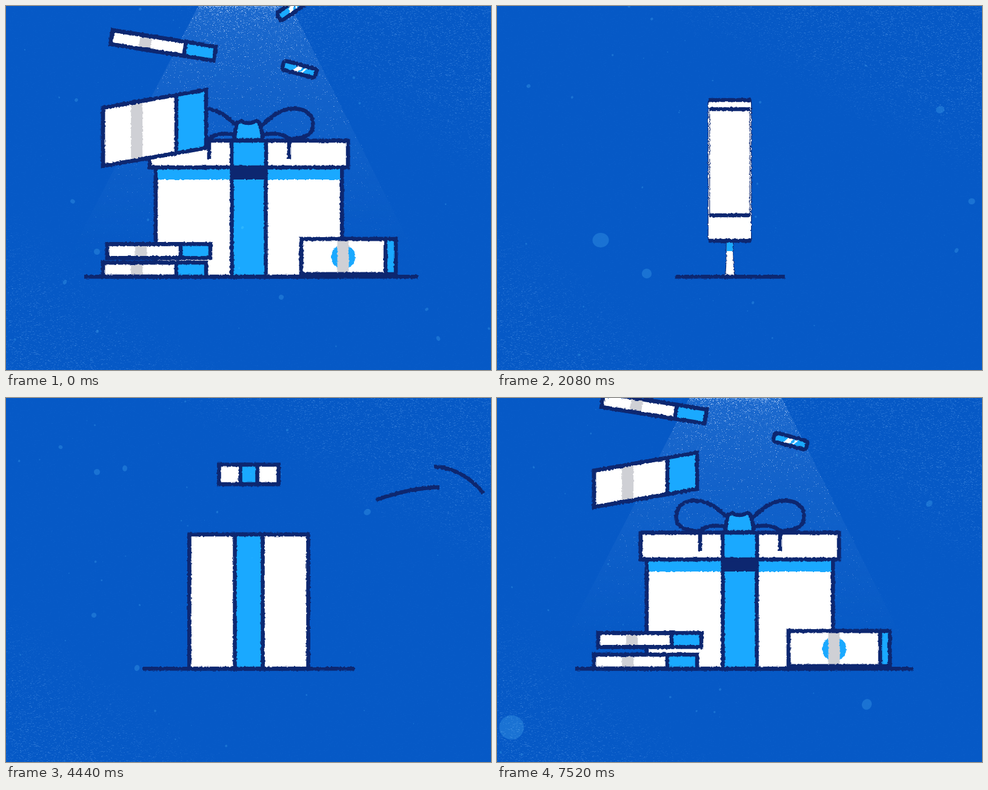
Recreate the animation shown at these times as an HTML page with a canvas. Size 800 by 600 pixels, loop 7.56 s.

```html
<!DOCTYPE html>
<html lang="en">
<head>
<meta charset="utf-8">
<title>Gift box</title>
<style>
html, body { margin: 0; width: 100%; height: 100%; overflow: hidden; background: #0659c6; }
canvas { position: absolute; left: 0; top: 0; }
#art { filter: url(#rough); }
#dust { mix-blend-mode: screen; }
svg { position: absolute; width: 0; height: 0; }
</style>
</head>
<body>
<svg><filter id="rough" x="0" y="0" width="100%" height="100%" color-interpolation-filters="sRGB">
  <feTurbulence type="fractalNoise" baseFrequency=".28" numOctaves="1" seed="4" result="n"/>
  <feDisplacementMap in="SourceGraphic" in2="n" scale="4" xChannelSelector="R" yChannelSelector="G"/>
</filter></svg>
<canvas id="paper" width="800" height="600"></canvas>
<canvas id="cone" width="800" height="600"></canvas>
<canvas id="art" width="800" height="600"></canvas>
<canvas id="dust" width="800" height="600"></canvas>
<script>
const LOOP = 7560, FRAME = 40, GROUND = 446;
const NAVY = '#0d2770', CYAN = '#1aa9ff', WHITE = '#fff', GREY = '#cfd0d5';
const el = id => document.getElementById(id);
const g = el('art').getContext('2d');

function seeded(s) {
  return () => {
    s = s + 0x6D2B79F5 | 0;
    let n = Math.imul(s ^ s >>> 15, 1 | s);
    n = n + Math.imul(n ^ n >>> 7, 61 | n) ^ n;
    return ((n ^ n >>> 14) >>> 0) / 4294967296;
  };
}

// Eased value from time/value pairs
function key(t, ...k) {
  if (t <= k[0]) return k[1];
  for (let i = 2; i < k.length; i += 2) {
    if (t > k[i]) continue;
    const f = (t - k[i - 2]) / (k[i] - k[i - 2]);
    return k[i - 1] + (k[i + 1] - k[i - 1]) * f * f * (3 - 2 * f);
  }
  return k[k.length - 1];
}

/* ---------- static textures ---------- */
function paintPaper() {
  const c = el('paper').getContext('2d'), r = seeded(3);
  c.fillStyle = '#0659c6';
  c.fillRect(0, 0, 800, 600);
  for (let i = 0; i < 50000; i++) {
    const x = r() * 800, y = r() * 600;
    const a = Math.max(x / 800 - y / 420 - .25, y / 600 - x / 800 - .5, .03);
    c.fillStyle = `rgba(95,160,235,${Math.min(.3, a * r() * 1.2)})`;
    c.fillRect(x | 0, y | 0, 1 + r() * 1.5, 1);
  }
}

function paintCone() {
  const c = el('cone').getContext('2d'), r = seeded(8);
  const glow = c.createLinearGradient(0, 0, 0, 420);
  glow.addColorStop(0, 'rgba(130,180,240,.17)');
  glow.addColorStop(.4, 'rgba(130,180,240,.09)');
  glow.addColorStop(1, 'rgba(130,180,240,0)');
  c.fillStyle = glow;
  c.beginPath();
  c.moveTo(317, 0); c.lineTo(470, 0); c.lineTo(690, 440); c.lineTo(90, 440);
  c.fill();
  for (let i = 0; i < 6500; i++) {
    const y = 430 * r() ** 1.9, left = 317 - y * .51, right = 470 + y * .51;
    c.fillStyle = `rgba(205,225,255,${(1 - y / 450) * r() ** 2.5})`;
    c.fillRect(left + (right - left) * r() | 0, y | 0, 1, 1);
  }
}

const bigSpecks = [
  [150,405,5, 97,455,4, 116,155,3, 454,480,4, 694,500,3, 713,548,4, 110,322,4],
  [171,386,12, 247,441,8, 783,322,5, 731,171,6, 758,403,4, 52,132,3],
  [150,122,5, 90,81,3, 196,116,5, 216,445,5, 355,365,5, 596,188,6, 145,358,4],
  [732,90,15, 77,471,5, 124,22,7, 794,436,7, 391,473,4, 68,424,4],
  [610,505,8, 713,174,6, 24,543,20]
];
let dustSet = -1;
function paintDust(n) {
  if (n === dustSet) return;
  dustSet = n;
  const c = el('dust').getContext('2d'), r = seeded(40 + n);
  const spot = (x, y, s) => {
    c.beginPath();
    c.ellipse(x, y, s, s * (.7 + r() * .5), r() * 3, 0, 7);
    c.fill();
  };
  c.clearRect(0, 0, 800, 600);
  c.fillStyle = 'rgba(80,155,235,.25)';
  const b = bigSpecks[n];
  for (let i = 0; i < b.length; i += 3) spot(b[i], b[i + 1], b[i + 2]);
  for (let i = 0; i < 45; i++) spot(r() * (i % 3 ? 500 : 800), r() * 600, .6 + 1.8 * r() ** 2);
}

/* ---------- drawing helpers ---------- */
function fill(x0, y0, x1, y1, color) {
  g.fillStyle = color;
  g.fillRect(x0, y0, x1 - x0, y1 - y0);
}
function outline(x0, y0, x1, y1) { g.strokeRect(x0, y0, x1 - x0, y1 - y0); }
function panel(x0, y0, x1, y1, color) {
  fill(x0, y0, x1, y1, color);
  outline(x0, y0, x1, y1);
}
function shape(d, color, line = true) {
  const p = new Path2D(d);
  if (color) { g.fillStyle = color; g.fill(p); }
  if (line) g.stroke(p);
}
function drawn(d, length, f) {
  if (f <= 0) return;
  g.setLineDash(f < 1 ? [length * f, 999] : []);
  shape(d);
  g.setLineDash([]);
}
function group(draw) { g.save(); draw(); g.restore(); }
function scaleAt(x, y, sx, sy) {
  g.translate(x, y); g.scale(sx, sy); g.translate(-x, -y);
}

/* ---------- gift ---------- */
const LOOP_D = 'M464 219C500 220 509 207 506 191C502 166 470 165 449 176C437 182 431 190 421 197';
const TAIL_D = 'M422 212C448 208 466 212 467 224L467 252';

function bow(t) {
  const grow = key(t, 4800, 0, 4920, 1.15, 5000, 1);
  const knot = t < 4000 || grow > 0;
  const size = t < 4000 ? 1 : grow;
  const side = (flip, loop, tail, stretch) => group(() => {
    if (flip) { g.translate(802, 0); g.scale(-1, 1); }
    group(() => {
      scaleAt(400, 219, 1 + (stretch - 1) * .1, stretch);
      drawn(LOOP_D, 172, loop);
    });
    drawn(TAIL_D, 82, tail);
  });
  const done = t < 4000;
  side(true, done ? 1 : key(t, 4900, 0, 5350, 1), done ? 1 : key(t, 5940, 0, 6140, 1), 1);
  side(false, done ? 1 : key(t, 5720, 0, 5920, .58, 6080, 1), done ? 1 : key(t, 5500, 0, 5700, 1),
    done ? 1 : key(t, 5920, 1.3, 6060, 1));
  if (knot && size > 0) group(() => {
    scaleAt(400, 221, 1, size);
    shape('M377 221C377 208 379 201 381 193Q386 189 391 191Q400 195 409 191Q416 188 418 193C421 201 423 208 423 221Z', CYAN);
  });
}

function gift(t) {
  const built = t < 4000;
  const turn = built ? key(t, 400, 0, 1400, 1) : 0;
  const anim = (...k) => built ? k[k.length - 1] : key(t, ...k);
  const half = anim(4040, 30, 4440, 98, 4760, 153.5);
  const top = anim(4040, 446, 4300, 212, 4440, 225, 4760, 266);
  const rib = anim(4040, 8, 4440, 23, 4760, 28);
  const C = 400.5, L = C - half, R = C + half - 2 * turn, front = C + half - 13 * turn;
  const r0 = C - rib - 6 * turn, r1 = C + rib - 9 * turn;

  panel(L, top, R, GROUND, CYAN);
  panel(L, top, front, GROUND, WHITE);
  const lidY = anim(4040, -60, 4440, 126, 4700, 250, 4780, 240, 4860, 244);
  const lidH = anim(4440, 16, 4720, 22), lidW = anim(4440, 49, 4720, 163.5);
  const landed = built || t > 4680;
  if (landed) fill(L + 3, lidY + lidH, front - 3, 286, CYAN);
  panel(r0, top, r1, GROUND, CYAN);
  if (landed) fill(r0, lidY + lidH, r1, 286, NAVY);

  const lr = anim(4440, 14, 4720, 28.5), y0 = lidY - lidH, y1 = lidY + lidH;
  panel(C - lidW, y0, C + lidW - 7 * turn, y1, CYAN);
  panel(C - lidW, y0, C + lidW - 39 * turn, y1, WHITE);
  panel(C - lr - 4 * turn, y0, C + lr - 7 * turn, y1, CYAN);
  bow(t);
}

function flyingRibbons(t) {
  if (t < 4200 || t > 4900) return;
  const dx = key(t, 4200, 240, 4440, 0, 4900, -330), dy = key(t, 4200, -60, 4440, 0, 4900, 60);
  group(() => {
    g.translate(dx, dy);
    shape('M610 168Q667 148 715 147M706 113C738 114 767 132 788 157');
  });
}

/* ---------- money ---------- */
function bundle(x, y, h, tilt, turn, shade, square) {
  const face = 121 - 11 * turn, w = 170 - 6 * turn, mid = face * .46;
  group(() => {
    g.transform(1, tilt, square ? 0 : -tilt, 1, x, y);
    fill(0, 0, face, h, WHITE);
    fill(face, 0, w, h, CYAN);
    fill(mid - 9.5, 0, mid + 9.5, h, GREY);
    if (shade) {
      fill(0, 0, face, h / 2, CYAN);
      fill(mid - 9.5, 0, mid + 9.5, h / 2, NAVY);
    }
    outline(0, 0, face, h);
    outline(0, 0, w, h);
  });
}

// rest x, landing time, speed, flight tilt
const bundles = [
  [160, 7020, 1.3, .1], [167, 7360, 1.3, -.12], [160, 7673, 1.65, -.175],
  [176, 7809, 1.2, .159], [149, 7960, 1.3, -.14], [151, 8120, 1.4, .12]
];
function stack(u, turn) {
  bundles.forEach(([x, land, speed, tilt], i) => {
    if (u < land - 420) return;
    const left = Math.max(0, land - u), air = Math.min(1, left / 90);
    const hop = i === 1 ? key(u, 7360, 0, 7480, 13, 7520, 12, 7560, 7, 7640, 0)
                        : key(u, land, 0, land + 60, 6, land + 130, 0);
    const h = i === 2 ? key(u, 7400, 24, 7520, 60, 7560, 96, 7620, 70, 7673, 23) : 23;
    const middle = 434.5 - 23.6 * i - left * speed - hop, px = x + 16 * turn;
    if (i === 5 && u >= 8880) { curled(px); return; }
    const slope = tilt * air;
    const shade = (i === 1 || i === 3) && u > bundles[i + 1][1];
    bundle(px, middle - h / 2 - slope * 85, h, slope, turn, shade, i === 2);
  });
}
function curled(x) {
  group(() => {
    g.translate(x - 167, 0);
    shape('M167 313L213 313C224 328 262 328 281 319L334 316Q330 328 320 328L184 328Q169 324 167 313Z', WHITE);
    shape('M281 319L334 316Q330 326 318 326L262 326Z', CYAN, false);
    shape('M167 313L213 313C224 328 262 328 281 319L334 316Q330 328 320 328L184 328Q169 324 167 313Z');
  });
}

function bill(u, turn) {
  if (u < 7060) return;
  const dy = -Math.max(0, 7400 - u) * 1.3 - 4 * (1 - turn);
  const x0 = key(u, 7400, 488, 7520, 481, 7560, 487, 7680, 488) + turn;
  const xs = key(u, 7400, 622, 7520, 632, 7560, 626, 7680, 625) - 11 * turn;
  const x1 = key(u, 7400, 638, 7520, 648, 7560, 643, 7680, 642) - 10 * turn;
  const mid = 556 - 5 * turn;
  group(() => {
    g.translate(0, dy);
    fill(x0, 388, x1, GROUND, WHITE);
    fill(xs, 388, x1, GROUND, CYAN);
    g.fillStyle = CYAN;
    g.beginPath(); g.arc(mid, 417.5, 20, 0, 7); g.fill();
    fill(mid - 9.5, 388, mid + 9.5, GROUND, GREY);
    outline(x0, 388, xs, GROUND);
    outline(x0, 388, x1, GROUND);
  });
}

// flight x, rest x, rest y, landing time, speed, tilt
const coins = [
  [484, 480, 438, 7962, .83, .26], [473, 486, 423, 8027, .9, -.6], [478, 471, 408, 8200, .95, .3]
];
function coinPile(u) {
  for (const [fx, rx, ry, land, speed, tilt] of coins) {
    if (u < land - 520) continue;
    const left = Math.max(0, land - u), air = Math.min(1, left / 200);
    group(() => {
      g.translate(rx + (fx - rx) * air, ry - left * speed);
      g.rotate(tilt * air);
      g.beginPath();
      g.roundRect(-28, -7.5, 56, 15, 4);
      g.fillStyle = CYAN;
      g.fill();
      shape('M-12 7L-2 -7L6 -7L-4 7ZM1 7L11 -7L14 -7L4 7Z', WHITE, false);
      g.beginPath();
      g.roundRect(-28, -7.5, 56, 15, 4);
      g.stroke();
    });
  }
}

/* ---------- monitor ---------- */
function monitor(t) {
  group(() => {
    scaleAt(384, GROUND, key(t, 2000, .04, 2340, 1.06, 2480, 1), 1);
    shape('M353 386C352 415 349 438 341 446L431 446C418 438 416 415 414 386Z', WHITE);
    shape('M356 390L411 390L412 404L355 404Z', CYAN, false);
    g.beginPath();
    g.roundRect(188, 155, 391, 232, 8);
    g.fillStyle = WHITE;
    g.fill();
    g.stroke();
    outline(202, 170, 566, 345);
  });
  for (let i = 0; i < 4; i++) {
    const w = key(t, 2420 + i * 70, 0, 2640 + i * 70, 86);
    fill(341, 217 + i * 18.5, 341 + w, 224 + i * 18.5, GREY);
  }
  const button = key(t, 2700, 0, 2860, 1, 3000, 1, 3060, .85, 3140, 1);
  if (button > 0) {
    g.fillStyle = CYAN;
    g.beginPath();
    g.roundRect(384 - 22 * button, 304 - 4.5 * button, 44 * button, 9 * button, 3);
    g.fill();
  }
  if (t > 2600) group(() => {
    g.translate(key(t, 2600, 120, 2960, 0), key(t, 2600, 100, 2960, 0));
    shape('M394 303L412 307L407 311L414 318L409 321L402 315L399 320Z', NAVY, false);
  });
}

/* ---------- liquid wipe ---------- */
function wipe(t) {
  if (t < 3400 || t > 4000) return;
  group(() => {
    scaleAt(400, 300, 1, key(t, 3680, 2, 3720, 1));
    g.translate((t - 3720) * 4.6, 0);
    g.fillStyle = CYAN;
    g.beginPath();
    g.ellipse(830, 270, 95, 82, 0, 0, 7);
    g.ellipse(1130, 400, 260, 130, 0, 0, 7);
    g.fill();
    shape('M-180 260C-180 90 -100 10 0 10C130 12 270 50 370 108C450 158 510 226 600 228' +
      'C680 222 740 216 800 245C960 320 1200 300 1250 430C1280 560 960 470 800 592' +
      'C700 680 200 650 110 600C70 582 40 565 0 548C-100 500 -180 400 -180 260Z', NAVY, false);
  });
}

function ground(t) {
  const x0 = key(t, 0, 129, 700, 129, 1400, 150, 2000, 300, 2400, 248, 3000, 253);
  const x1 = key(t, 0, 680, 800, 674, 1400, 650, 2000, 470, 2400, 516, 3000, 511);
  const n0 = key(t, 4000, 400, 4440, 225, 4900, 176, 5920, 173, 6750, 170, 7000, 127, 7560, 129);
  const n1 = key(t, 4000, 400, 4440, 575, 4900, 626, 5920, 630, 6750, 632, 7000, 692, 7520, 687, 7560, 680);
  const early = t < 3680;
  fill(early ? x0 : n0, 443, early ? x1 : n1, 449.5, NAVY);
}

function render(t) {
  const u = t < 3000 ? t + LOOP : t;
  g.clearRect(0, 0, 800, 600);
  g.strokeStyle = NAVY;
  g.lineWidth = 6.5;

  if (t < 2000) {
    group(() => {
      scaleAt(395, GROUND, key(t, 1560, 1, 2000, .04), 1);
      gift(t);
    });
  } else if (t < 3680) {
    monitor(t);
  } else if (t >= 4040) {
    gift(t);
  }
  flyingRibbons(t);
  const flat = t < 3000 ? key(t, 1440, 1, 1800, 0) : 1;
  if (flat > 0) group(() => {
    scaleAt(400, GROUND, 1, flat);
    const turn = t < 3000 ? key(t, 400, 0, 1400, 1) : 0;
    stack(u, turn);
    bill(u, turn);
    coinPile(u);
  });
  if (t < 3680 || t >= 4000) ground(t);
  wipe(t);

  el('cone').style.opacity = t < 3680
    ? key(t, 1560, 1, 1800, 0, 2360, 0, 2760, 1)
    : key(t, 4640, 0, 5200, 1);
  paintDust(t < 1560 ? 0 : t < 3080 ? 1 : t < 4600 ? 2 : t < 6120 ? 3 : 4);
}

paintPaper();
paintCone();
const start = performance.now();
let last = -1;
function tick() {
  const t = Math.floor((performance.now() - start) % LOOP / FRAME) * FRAME;
  if (t !== last) render(last = t);
  requestAnimationFrame(tick);
}
tick();
</script>
</body>
</html>
```
